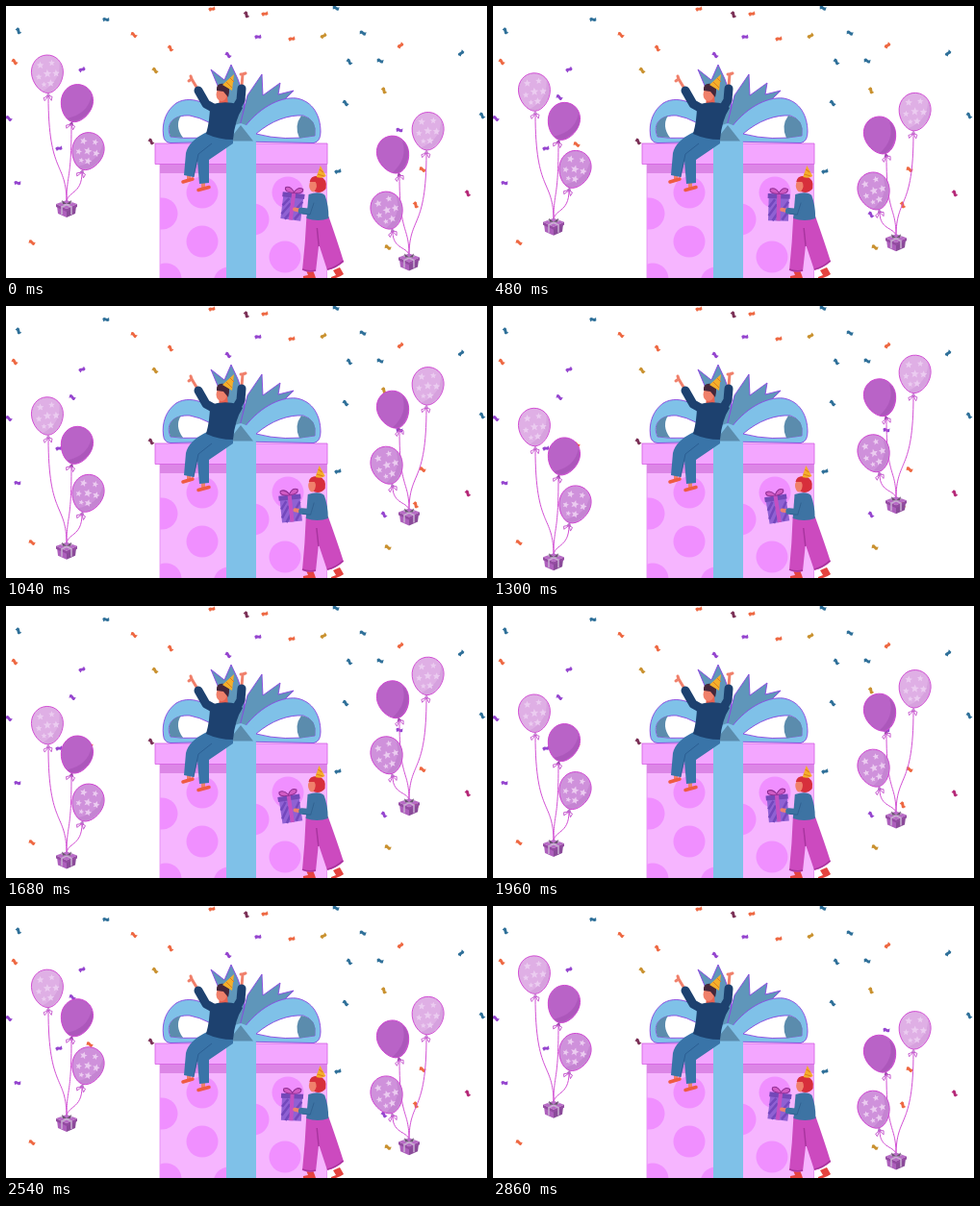
An HTML page that plays this animation: 500x283 px, repeating every 2.88 s.

```html
<!DOCTYPE html>
<html lang="en">
<head>
<meta charset="utf-8">
<title>Birthday party</title>
<style>
html, body { margin: 0; width: 100%; height: 100%; overflow: hidden; background: #fff; }
svg { display: block; width: 100vw; height: 100vh; }
</style>
</head>
<body>
<svg viewBox="0 0 500 283">
  <defs><clipPath id="boxClip"><path d="M160 172H333V283H160Z"/></clipPath></defs>
  <g id="confetti"></g>

  <!-- large present -->
  <path d="M160 164H333.500V284H160Z" fill="#f6b5ff" stroke="#e58cf2" stroke-width=".8"/>
  <g id="dots" fill="#f08fff" clip-path="url(#boxClip)"></g>
  <path d="M160 164H333.500V174H160Z" fill="#dc86e6"/>
  <path d="M155 143H334V164.500H155Z" fill="#f3a6ff" stroke="#d45fe2" stroke-width=".8"/>
  <path d="M229 142H260V283H229Z" fill="#7fc1e8"/>

  <!-- bow -->
  <g stroke="#8a45e0" stroke-width=".9" stroke-linejoin="round">
    <path d="M240 131L213 66L227 77L234 61L241 76L248 96L246 131Z" fill="#5f96ba"/>
    <path d="M241 133L251 93L266 71L267 93L285 80L283 92L299 88L288 99L256 134Z" fill="#5f96ba"/>
    <path d="M236 128C218 103 194 91 177 101C166 109 162 122 163.500 134Q164 142 171 142.500L237 141Z M171 136C165 122 175 113 191 114Q212 118 226 133Q198 140 171 136Z" fill="#7fc1e8" fill-rule="evenodd"/>
    <path d="M245 130C261 107 284 94 302 96C319 99 327 114 327 131Q327 141 320 142.500L244 141Z M260 133C276 119 294 113 309 114Q323 118 321 135Q290 141 260 133Z" fill="#7fc1e8" fill-rule="evenodd"/>
  </g>
  <path d="M171 136Q165 119 182 114Q175 125 184 137Z M305 137.500Q299 125 307 114Q324 117 321 135Z" fill="#5b8cad"/>
  <path d="M231 126L244 122L258 127L260 143H229Z" fill="#7fc1e8"/>
  <path d="M231 140.500L244 124L257 140.500Z" fill="#5b8cad"/>

  <!-- sitting man -->
  <g stroke-linecap="round" stroke-linejoin="round" fill="none">
    <path d="M199 86L193 76M245 83L246 71M190 78L193 76L192 73M244 71L246 71L249 70" stroke="#f0806b" stroke-width="3"/>
    <path d="M219 108L208 102L200 88M238 108L244 98L245 86" stroke="#1d416f" stroke-width="9"/>
    <path d="M190 176V181M205 184V189" stroke="#f0806b" stroke-width="4"/>
    <path d="M184 183L194 180M200 191.500L211 188.500" stroke="#ef5b43" stroke-width="3.500"/>
  </g>
  <path d="M222 94L230 93L231 105H221Z" fill="#e9604f"/>
  <path d="M209 131Q190 140 187 153L185 176L195 178L199 161L201 185L211 184L211 160L236 143L236 131Z" fill="#3974a8"/>
  <path d="M195 178L200 154L214 143" fill="none" stroke="#28598d" stroke-width=".8"/>
  <path d="M212 103Q226 98 241 102L246 106Q238 118 236 139Q221 139 208 133Q212 119 212 103Z" fill="#1d416f"/>
  <ellipse cx="224" cy="92" rx="5.500" ry="7" fill="#f0806b"/>
  <path d="M219 88Q218 79 228 81Q234 83 231 95L226 89Z" fill="#45263b"/>
  <path d="M225 82L237 71L235 88Z" fill="#f4af2b"/>
  <path d="M229 79L235 85M233 75L237 79" stroke="#e07a20"/>

  <!-- standing woman -->
  <path d="M312 275H319L321 280L322 283H309V281L314 280Z M340 275L347 272L351 279Q346 283 338 284V282L343 280Z" fill="#e5433f"/>
  <g id="woman">
    <path d="M312 219L335 219Q344 244 351 266Q343 273 334 275L325 248L322 276Q314 278 308 275Q311 246 312 219Z" fill="#cc4abf"/>
    <path d="M308 274Q315 277 322 275M334 274Q343 272 350.500 265M325 250L323 231" fill="none" stroke="#a9359f" stroke-width="1.500"/>
    <path d="M314 196Q326 192 331 197Q335 207 335 221Q324 225 312 221Z" fill="#3d73a3"/>
    <ellipse cx="319" cy="187" rx="4.500" ry="6.500" fill="#f0806b"/>
    <path d="M315 183Q316 176 325 177Q334 180 332 190Q327 196 320 193Q324 187 321 183Z" fill="#d72f3b"/>
    <path d="M322 178L326 166L332 177Q328 180 322 178Z" fill="#f4af2b"/>
    <path d="M323 175L330 177M325 170L329 173" stroke="#e07a20"/>
  </g>
  <g id="present">
    <path d="M-10.500 -10H10.500V14H-10.500Z" fill="#8f61d3"/>
    <path d="M-10 0L-4 -8M-10 9L-2 -3M-6 14L0 5M4 3L10 -6M4 13L10 4" stroke="#7348bd" stroke-width="2.500"/>
    <path d="M-11.500 -14H11.500V-9H-11.500Z" fill="#7448b8"/>
    <path d="M-2 -14H2V14H-2Z" fill="#c44fc2"/>
    <path d="M0 -14Q-11 -14 -9 -19Q-4 -21 0 -15Q4 -22 9 -19Q10 -14 0 -14Z" fill="#d15bc4" stroke="#8f2d94"/>
  </g>
  <g id="arm" fill="none" stroke-linecap="round" stroke-linejoin="round">
    <path d="M307 213L300 211.500" stroke="#f0806b" stroke-width="4"/>
    <path d="M320 201L316 214L307 213" stroke="#3d73a3" stroke-width="6.500"/>
    <path d="M320 205L316 217L308 216" stroke="#2c5b8a" stroke-width=".7"/>
  </g>

  <g id="left"></g>
  <g id="right"></g>
</svg>
<script>
const $ = id => document.getElementById(id);
const LOOP = 2880, HOLD = 60, TRAVEL = LOOP / 2 - HOLD;

// Confetti positions by colour, as x,y pairs
const confetti = {
  '#2f7099': [13,26, 104,14, 343,2, 357,58, 371,28, 389,57, 473,49, 353,101, 495,114, 345,172],
  '#ee6842': [214,3, 269,8, 133,30, 171,44, 297,34, 9,58, 410,41, 426,207, 27,246, 87,144, 433,170],
  '#9545cf': [231,51, 262,32, 3,117, 12,184, 79,66, 69,95, 55,148, 409,129, 393,217],
  '#c9912f': [155,67, 330,31, 393,88, 397,251],
  '#7a2f55': [151,141, 250,9],
  '#b52878': [480,195]
};
for (const [color, p] of Object.entries(confetti)) {
  for (let i = 0; i < p.length; i += 2) {
    const turn = (p[i] * 37 + p[i + 1] * 11) % 110 - 55;
    $('confetti').innerHTML += `<path transform="translate(${p[i]} ${p[i + 1]}) rotate(${turn})"
      d="M-3.500 -1.500Q-1.500 -3 0 -1.500T3.500 -1.500L3 2Q1.500 3 0 1.700T-3 2Z" fill="${color}"/>`;
  }
}

const dots = [[204,194], [204,245], [162,216], [293,194], [290,261], [257,222], [166,284], [232,288]];
$('dots').innerHTML = dots.map(([x, y]) => `<circle cx="${x}" cy="${y}" r="16.500"/>`).join('');

function star(x, y, r) {
  let points = '';
  for (let i = 0; i < 10; i++) {
    const a = i * Math.PI / 5 - Math.PI / 2, d = i % 2 ? r * .45 : r;
    points += `${(x + d * Math.cos(a)).toFixed(1)},${(y + d * Math.sin(a)).toFixed(1)} `;
  }
  return `<polygon points="${points}" fill="#ebccf0"/>`;
}

// Balloon centred on x,y and tied at kx,ky
function balloon([x, y, kx, ky, fill, shade, stars]) {
  const tilt = Math.atan2(x - kx, ky - y) * 180 / Math.PI;
  const pattern = [[-7,-9,4], [5,-11,3.5], [0,0,4.5], [9,0,4], [-9,3,3.5], [3,10,4], [-4,11,3]];
  return `<g transform="translate(${x} ${y}) rotate(${tilt})">
    <path d="M0 19L-2.500 23.500H2.500Z" fill="${shade}"/>
    <path d="M0 23L-5 25L-4 28ZM0 23L4 24L3 28Z" fill="none" stroke="#c75bd0" stroke-width=".9"/>
    <path d="M0 -19.500C10 -19.500 16.500 -11 16.500 -2C16.500 9 8 20 0 20S-16.500 9 -16.500 -2C-16.500 -11 -10 -19.500 0 -19.500Z"
      fill="${fill}" stroke="#cf45d2" stroke-width=".9"/>
    <path d="M13 -11Q14 8 -6 18Q0 21 6 17Q22 2 13 -11Z" fill="${shade}" opacity=".45"/>
    ${stars ? pattern.map(s => star(...s)).join('') : ''}</g>`;
}

function bunch(id, x, y, balloons) {
  const strings = balloons.map(([, , kx, ky]) => {
    const h = y - 6 - ky;
    return `M${kx} ${ky}C${kx} ${ky + h * .75} ${x} ${ky + h * .6} ${x} ${y - 6}`;
  }).join('');
  $(id).innerHTML = `<path d="${strings}" fill="none" stroke="#d24fd4"/>
    ${balloons.map(balloon).join('')}
    <g transform="translate(${x} ${y})">
      <path d="M-10 -3L0 1V9L-9 5Z" fill="#ad5fbc"/>
      <path d="M10 -3L0 1V9L9 5Z" fill="#8a4a99"/>
      <path d="M-11 -5L0 -9L11 -5L0 0Z" fill="#b86bc6"/>
      <path d="M-11 -5L0 0L11 -5V-2L0 3L-11 -2Z" fill="#944ba2"/>
      <path d="M-6 -7L5 -2V6M6 -7L-5 -2V6" fill="none" stroke="#c9b0d2" stroke-width="1.500"/>
      <path d="M0 -5L-5 -9L-4 -5ZM0 -5L5 -9L4 -5Z" fill="#69536f"/>
    </g>`;
}

const light = ['#dfafe5', '#cd91d6', true];
const dark = ['#b963c7', '#9e49ad', false];
const mid = ['#cf91db', '#b976c8', true];
bunch('left', 63, 211, [[43, 70.5, 44, 94, ...light], [73.5, 101, 68, 123, ...dark], [85, 151, 79, 173, ...mid]]);
bunch('right', 419, 266.5, [[438.5, 130, 437, 153, ...light], [402.5, 154.5, 409, 177, ...dark], [396, 212.5, 402, 235, ...mid]]);

function draw(now) {
  const t = now % LOOP;
  const along = (Math.min(t, LOOP + HOLD - t) - HOLD) / TRAVEL;
  const p = Math.max(0, Math.min(1, along));
  const move = (id, value) => $(id).setAttribute('transform', value);
  move('left', `translate(0 ${61.5 * p})`);
  move('right', `translate(0 ${-66 * p})`);
  move('present', `translate(${297.5 - 2 * p} ${208.5 + 3 * p}) rotate(${7 - 18 * p})`);
  move('woman', `rotate(${.4 - .8 * p} 330 281)`);
  move('arm', `rotate(${-3 * p} 320 201)`);
  requestAnimationFrame(draw);
}
draw(performance.now());
</script>
</body>
</html>
```
